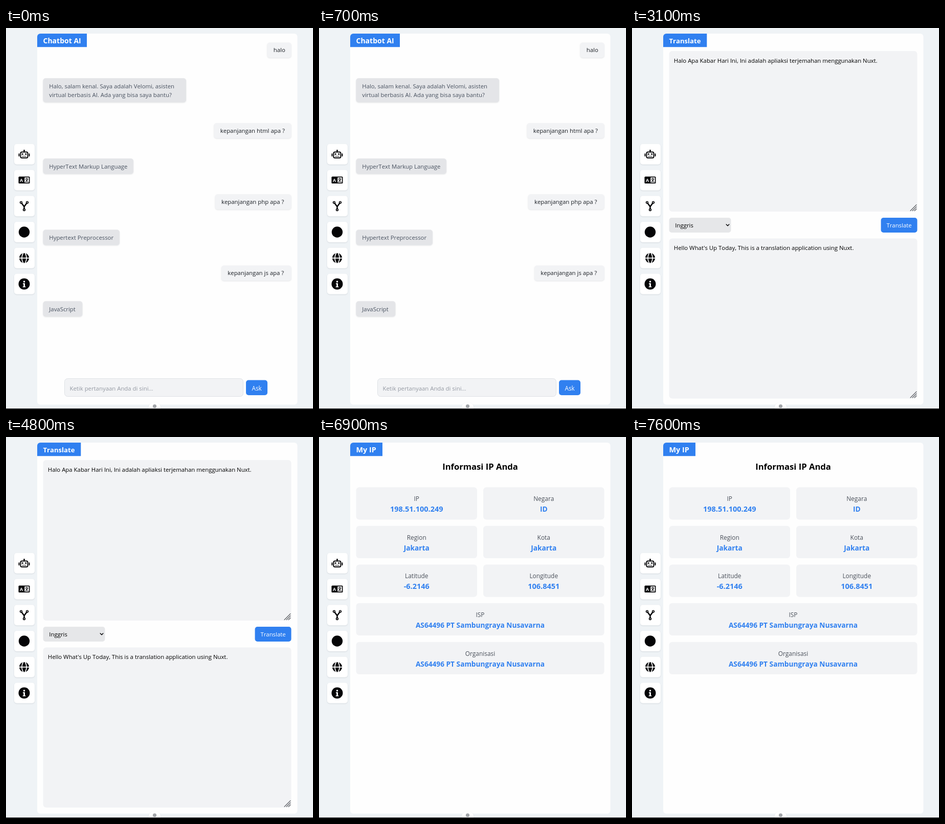
Animation, 600 px wide and 745 px high, one loop 8000 ms. Source, as an HTML page:

```html
<!DOCTYPE html>
<html lang="id">
<head>
<meta charset="utf-8">
<title>Chatbot AI</title>
<style>
  html, body { margin: 0; width: 100%; height: 100%; overflow: hidden; background: #eff3f6; }
  svg { display: block; width: 600px; height: 745px; font: 11.36px "Open Sans", "Noto Sans", sans-serif; font-kerning: none; }
  text { white-space: pre; }
  .tile, .bubble { filter: drop-shadow(0 1px 1px rgba(30, 40, 60, .12)); }
  .scene { visibility: hidden; }
  .line { fill: none; stroke: #050507; stroke-width: 2; stroke-linecap: round; }
</style>
</head>
<body>
<svg id="stage" viewBox="0 0 600 745"></svg>
<script>
const LOOP = 8000;
const BLUE = '#3080f0', SOFT = '#f2f3f5', GREY = '#e4e5e8', INK = '#050507';

const box = (x, y, x2, y2, fill, r = 6, extra = '') =>
  `<rect x="${x}" y="${y}" width="${x2 - x}" height="${y2 - y}" rx="${r}" fill="${fill}" ${extra}/>`;
const dot = (x, y, r, fill = INK) => `<circle cx="${x}" cy="${y}" r="${r}" fill="${fill}"/>`;
const line = (d, extra = '') => `<path class="line" d="${d}" ${extra}/>`;
const text = (str, x, y, fill = '#000', extra = '') =>
  `<text x="${x}" y="${y}" fill="${fill}" ${extra}>${str}</text>`;
const bold = size => `font-weight="700" font-size="${size}"`;
const centred = extra => `text-anchor="middle" ${extra}`;

const tab = (title, right, size) =>
  `<path d="M61 37.3V17a6 6 0 0 1 6-6H${right}V37.3Z" fill="${BLUE}"/>` +
  text(title, 72.5, 30, '#fff', bold(size));

// Each icon is drawn around its own centre.
const icons = [
  box(-7, -4.3, 7, 7.3, 'none', 2.5, `stroke="${INK}" stroke-width="2"`) +
    line('M0-7.5V-5M-10-.5V3.5M10-.5V3.5') + dot(0, -7.4, 1.5) +
    dot(-3.2, -.2, 1.5) + dot(3.2, -.2, 1.5) +
    line('M-3.6 4H3.8', 'style="stroke-width:1.6;stroke-linecap:butt;stroke-dasharray:1.8 1"'),
  box(-11, -7, 11, 6.5, INK, 1.6) + box(.8, -5.2, 9.3, 4.7, '#fff', .5) +
    text('A', -5.3, 3.3, '#fff', centred(bold(9))) +
    line('M2.6-2.6H7.6M5-4V-2.6M7-2.6Q6 1.6 2.8 3.2M3.5-1.2Q5 2.2 7.6 3.2', 'style="stroke-width:1.1"'),
  line('M-5.5-6.5L0 1L5.5-6.5M0 1V6', 'style="stroke-width:2.5"') +
    [[-6, -7.2], [6, -7.2], [0, 7.2]].map(([x, y]) => dot(x, y, 2.7) + dot(x, y, 1, '#fff')).join(''),
  dot(0, 0, 10.7),
  dot(0, 0, 9.7) +
    '<path d="M-10 0H10M-1.7-10Q-7.5 0-1.7 10M1.7-10Q7.5 0 1.7 10" fill="none" stroke="#fff" stroke-width="1.7"/>',
  dot(0, 0, 11) + dot(0, -4.5, 1.8, '#fff') +
    '<path d="M-2.5-1.5H1.5V5H2.8V6.5H-2.8V5H-1.2V.2H-2.5Z" fill="#fff"/>'
];

const sidebar = icons.map((icon, i) => {
  const y = 246.8 + i * 50.75;
  return box(16, y - 20, 56, y + 20, '#fff', 5, 'class="tile"') +
    `<g transform="translate(35.5 ${y})">${icon}</g>`;
}).join('');

const ask = (str, left, y) =>
  box(left, y, 557.5, y + 29.5, SOFT, 5, 'class="bubble"') + text(str, left + 12.3, y + 18.5, '#1c2026');
const reply = (lines, right, y) =>
  box(72.5, y, right, y + 13 + lines.length * 17, GREY, 5, 'class="bubble"') +
  lines.map((str, i) => text(str, 84.3, y + 19.2 + i * 17.3, '#495260')).join('');

const chat = tab('Chatbot AI', 158, 14) +
  ask('halo', 510.5, 28.5) +
  reply(['Halo, salam kenal. Saya adalah Velomi, asisten',
         'virtual berbasis AI. Ada yang bisa saya bantu?'], 352, 98.3) +
  ask('kepanjangan html apa ?', 406.5, 186) +
  reply(['HyperText Markup Language'], 249, 255.3) +
  ask('kepanjangan php apa ?', 408.7, 325.2) +
  reply(['Hypertext Preprocessor'], 222, 394.5) +
  ask('kepanjangan js apa ?', 421, 464.5) +
  reply(['JavaScript'], 149.3, 534.3) +
  box(114.5, 685.5, 463.5, 720.5, SOFT, 6, 'stroke="#dfe2e6"') +
  text('Ketik pertanyaan Anda di sini...', 124.5, 708.7, '#959aa3') +
  box(469, 688.5, 511, 718, BLUE, 5) + text('Ask', 480.5, 708.7, '#fff', 'font-size="11.7"');

const area = (str, top, bottom) =>
  box(72.5, top, 557.5, bottom, SOFT) + text(str, 81.8, top + 22.8) +
  [12, 8, 4].map(n => line(`M${556 - n} ${bottom - 1.5}L556 ${bottom - 1.5 - n}`,
    'style="stroke:#55585d;stroke-width:1.1"')).join('');

const translate = tab('Translate', 146.3, 13.1) +
  area('Halo Apa Kabar Hari Ini, Ini adalah apliaksi terjemahan menggunakan Nuxt.', 45, 359) +
  box(72.5, 371, 193.5, 400, '#e6e7e9', 5) + text('Inggris', 84.3, 389.8) +
  line('M184.2 384L187 386.8L189.8 384', 'style="stroke-width:1.5"') +
  box(486.5, 371, 557.5, 400, BLUE, 5) + text('Translate', 522, 389.8, '#fff', centred('')) +
  area("Hello What's Up Today, This is a translation application using Nuxt.", 411.5, 724.5);

const card = (label, value, col, y, size = 13.7) => {
  const [left, right] = [[72.5, 309], [321, 557.5], [72.5, 557.5]][col];
  const mid = (left + right) / 2;
  return box(left, y, right, y + 63.3, SOFT) +
    text(label, mid, y + 26.8, '#4b515b', centred('font-size="11.9" font-weight="500"')) +
    text(value, mid, y + 48, BLUE, centred(bold(size)));
};
const provider = 'AS64496 PT Sambungraya Nusavarna';

const myIp = tab('My IP', 124, 14.4) +
  text('Informasi IP Anda', 315, 64.3, '#000', centred(bold(16.6))) +
  card('IP', '198.51.100.249', 0, 98.3, 14.5) + card('Negara', 'ID', 1, 98.3) +
  card('Region', 'Jakarta', 0, 173.8) + card('Kota', 'Jakarta', 1, 173.8) +
  card('Latitude', '-6.2146', 0, 249.4, 14.5) + card('Longitude', '106.8451', 1, 249.4, 14.5) +
  card('ISP', provider, 2, 324.8) + card('Organisasi', provider, 2, 400.8);

const scenes = [[0, chat], [3100, translate], [6900, myIp]];

const stage = document.getElementById('stage');
stage.innerHTML = box(0, 0, 600, 745, '#eff3f6', 0) +
  box(61, 11, 569.5, 736.5, '#fefefe') + sidebar +
  scenes.map(([, body]) => `<g class="scene">${body}</g>`).join('') +
  `<g class="tile">${dot(290.5, 743.5, 12, '#fff')}</g>` + dot(290.5, 739.5, 3.6, '#a3a6aa') +
  box(0, 744, 600, 745, '#08080b', 0);

const groups = [...stage.querySelectorAll('.scene')];
function draw(now) {
  const t = now % LOOP;
  const current = scenes.filter(([start]) => start <= t).length - 1;
  groups.forEach((g, i) => { g.style.visibility = i === current ? 'visible' : 'hidden'; });
}
function tick() {
  draw(performance.now());
  requestAnimationFrame(tick);
}
tick();
</script>
</body>
</html>
```
